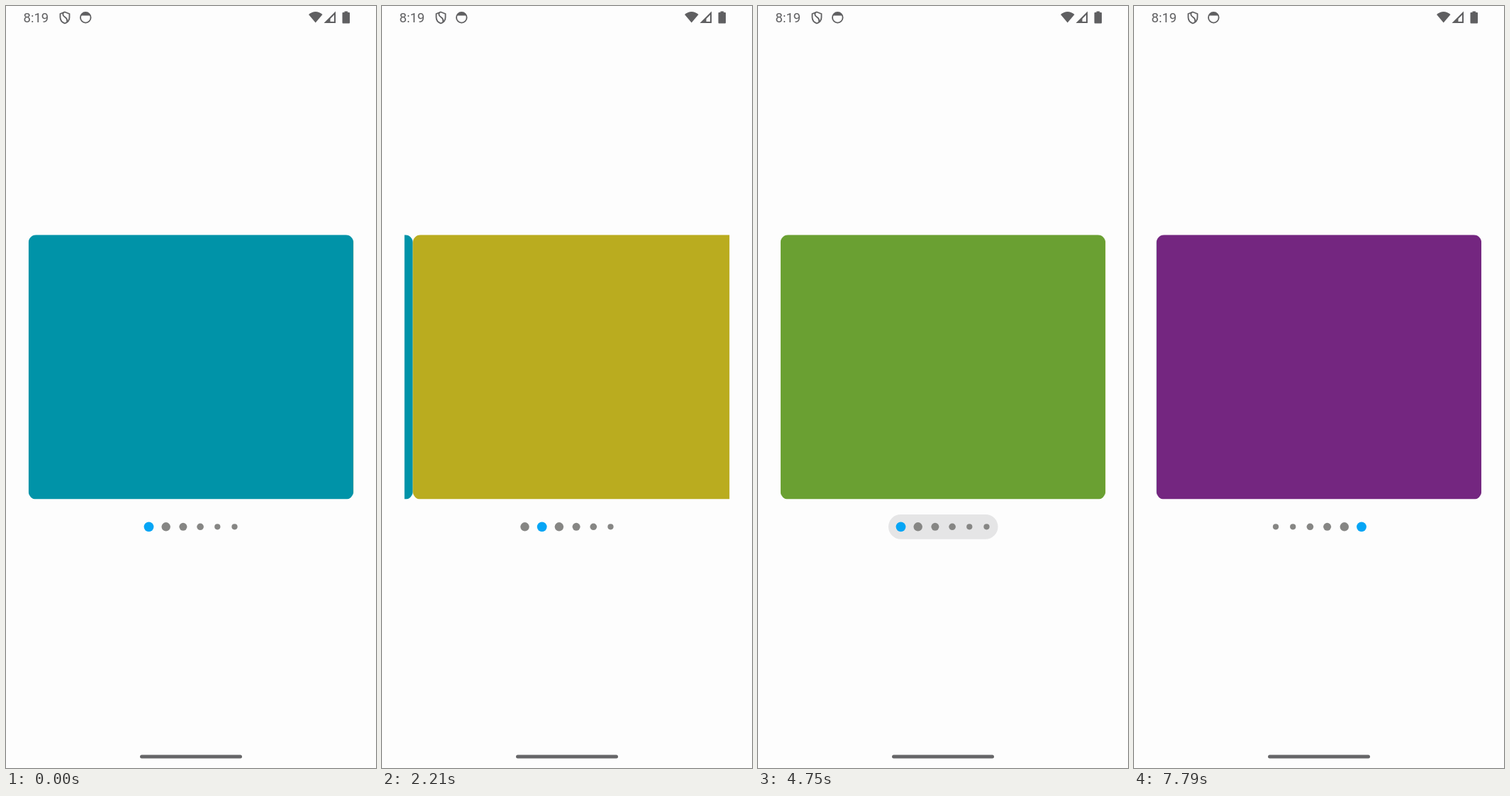
Recreate the animation shown at these times as an HTML page. Size 522x1073 px, loop 8000 ms.

```html
<!DOCTYPE html>
<html lang="en">
<head>
<meta charset="utf-8">
<title>Pager with dot indicator</title>
<style>
  html, body { margin: 0; width: 100%; height: 100%; overflow: hidden; background: #fdfdfd; }
  svg { display: block; width: 522px; height: 1073px; }
  .ink { fill: #5f5f61; }
  .line { fill: none; stroke: #5f5f61; stroke-width: 1.8; }
  text { font: 18.5px Roboto, sans-serif; }
</style>
</head>
<body>
<svg viewBox="0 0 522 1073">
  <defs>
    <clipPath id="view"><rect x="31.7" y="322.2" width="458.5" height="372.4"/></clipPath>
    <clipPath id="cap"><rect x="104" y="7" width="17" height="6.5"/></clipPath>
  </defs>

  <text class="ink" x="24.5" y="23">8:19</text>
  <path class="line" d="M83 8.5 89.5 11V16Q89.5 22 83 24.5Q76.5 22 76.5 16V11Z"/>
  <path class="line" d="M81 9Q79 13 83 15.5T86 22"/>
  <circle class="line" cx="112.3" cy="16.3" r="7.3"/>
  <circle class="ink" cx="112.3" cy="16.3" r="7.3" clip-path="url(#cap)"/>
  <path class="ink" d="M427 12Q436.7 4 446.5 12L436.7 23.5Z"/>
  <path class="ink" fill-rule="evenodd" d="M465 7.5V24H448.5ZM463 12.5 457.5 18V22H463Z"/>
  <path class="ink" d="M477.5 7.5H482V9H484Q485 9 485 10V23.5Q485 24.5 484 24.5H475.5Q474.5 24.5 474.5 23.5V10Q474.5 9 475.5 9H477.5Z"/>

  <g clip-path="url(#view)"><g id="pages"></g></g>
  <rect id="pill" x="184" y="716" width="154.5" height="34.7" rx="17.35" fill="#e5e5e6"/>
  <g id="dots"></g>
  <rect x="189" y="1054.5" width="144" height="5" rx="2.5" fill="#666668"/>
</svg>

<script>
const LOOP = 8000, FPS = 24, COUNT = 6, PAGE = 458.5, GAP = 24.2;
const TEAL = '#0093a8', GREEN = '#6aa032';
const COLORS = [TEAL, '#baac1f', '#7a7470', '#6f7f86', '#0a7064', '#742680'];

const SWIPE_ON = 1840, SWIPE_BACK = 2880;
const TAP_ON = 4000, TAP_BACK = 4540;
const PRESS = 4750, RELEASE = 7750;
// The finger scrubbing along the dots: [ms, page]
const FINGER = [[4860, 0], [5500, 1.5], [6130, 5], [7020, 3], [7100, 3], [7530, 5]];
const ROW_SCROLLED = 6040;

const $ = id => document.getElementById(id);
function add(parent, tag, attrs) {
  const el = document.createElementNS('http://www.w3.org/2000/svg', tag);
  for (const name in attrs) el.setAttribute(name, attrs[name]);
  return parent.appendChild(el);
}

const pages = COLORS.map((fill, i) => add($('pages'), 'rect', {
  x: 31.7 + i * PAGE, y: 322.2, width: PAGE, height: 372.4, rx: 11, fill
}));
const dots = COLORS.map(() => add($('dots'), 'circle', { cy: 733.3 }));

// A short drag, then the page settles exponentially
function swipe(ms) {
  const drag = 160, rest = 0.207;
  if (ms <= 0) return 0;
  if (ms > drag) return 1 - rest * Math.exp((drag - ms) / 100);
  const u = ms / drag;
  return (1 - rest) * u * u * (3 - 2 * u);
}

function along(points, ms) {
  const i = points.findIndex(p => p[0] > ms);
  if (i < 0) return points[points.length - 1][1];
  if (i === 0) return points[0][1];
  const [t0, a] = points[i - 1], [t1, b] = points[i];
  return a + (b - a) * (ms - t0) / (t1 - t0);
}

function position(ms) {
  if (ms >= PRESS) return Math.round(along(FINGER, ms));
  if (ms >= TAP_ON) return ms < TAP_BACK ? 1 : 0;
  return swipe(ms - SWIPE_ON) - swipe(ms - SWIPE_BACK);
}

function render(ms) {
  const tick = Math.floor((ms + 10) * FPS / 1000) * 1000 / FPS;
  const pos = position(ms < TAP_ON ? tick : ms);
  const active = Math.round(pos);
  const left = ms < ROW_SCROLLED ? 201.5 : 200;

  // The first page gets a new colour when it is built again
  pages[0].setAttribute('fill', ms < SWIPE_BACK ? TEAL : GREEN);
  $('pages').setAttribute('transform', `translate(${-pos * PAGE})`);
  $('pill').style.opacity = ms >= PRESS && ms < RELEASE ? 1 : 0;
  dots.forEach((dot, i) => {
    const far = Math.abs(i - active);
    dot.setAttribute('cx', left + i * GAP);
    dot.setAttribute('r', 6.9 - 0.7 * Math.min(far, COUNT - 2));
    dot.setAttribute('fill', far ? '#868684' : '#05a5f5');
  });
}

const begin = performance.now();
function frame() {
  render((performance.now() - begin) % LOOP);
  requestAnimationFrame(frame);
}
frame();
</script>
</body>
</html>
```
